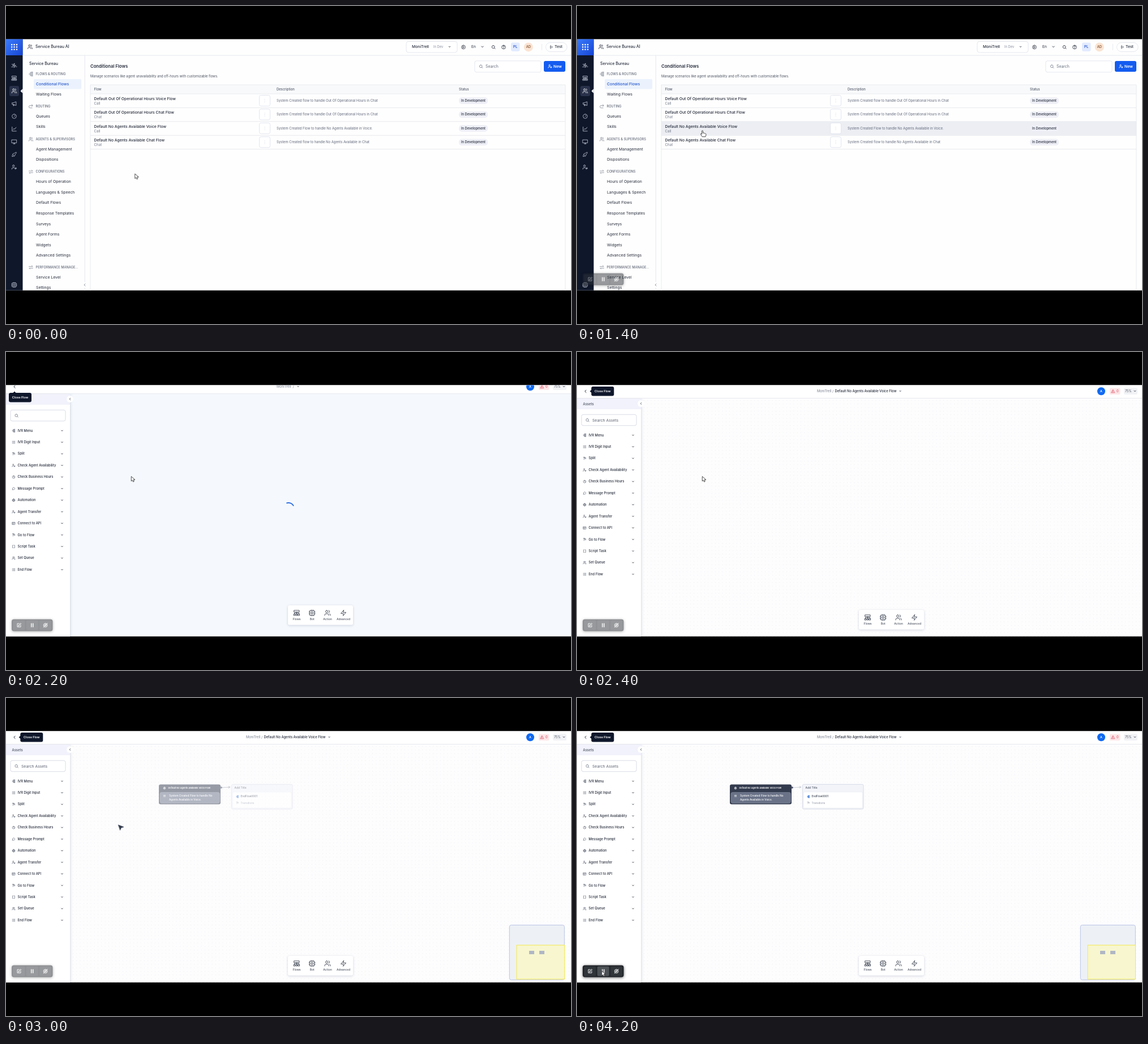
An HTML page with a canvas for the animation above (4400 ms loop, 998 by 561 pixels).

```html
<!DOCTYPE html>
<html lang="en">
<head>
<meta charset="utf-8">
<title>Flow console</title>
<style>
html, body { margin: 0; width: 100%; height: 100%; overflow: hidden; background: #000; }
canvas { display: block; }
</style>
</head>
<body>
<canvas id="stage" width="998" height="561"></canvas>
<script>
const stage = document.getElementById('stage');
const spare = stage.cloneNode();
let ctx = stage.getContext('2d');
const STEP = 200, LOOP = 4400;
const INK = '#252b3a', GREY = '#747b8a', LINE = '#e3e5ec', BLUE = '#145cf0', NIGHT = '#0f172b';

// Icons live on a 24 unit grid
const RING = 'M12 3a9 9 0 1 0 0 18a9 9 0 0 0 0-18';
const USER = 'M16 21v-2a4 4 0 0 0-4-4H6a4 4 0 0 0-4 4v2M9 3a4 4 0 1 0 0 8a4 4 0 0 0 0-8';
const icons = {
  user: USER + 'M19 14v6M16 17h6',
  users: USER + 'M22 21v-2a4 4 0 0 0-3-3.9M16 3.1a4 4 0 0 1 0 7.8',
  bolt: 'M13 2L3 14h9l-1 8 10-12h-9z',
  spark: 'M13 3L5 13h7l-1 8 8-10h-7zM2 7h5M1 18h5M18 17h5',
  tree: 'M3 3h18v6H3zM12 9v7M4 16v-4h16v4M2 16h5v5H2zM10 16h4v5h-4zM17 16h5v5h-5z',
  horn: 'M3 9v6h4l13 5V4L7 9zM8 15v6h3v-5',
  gauge: RING + 'M12 13l4-5',
  clock: RING + 'M12 7v5l4 2',
  chart: 'M3 3v18h18M7 15l4-5 3 3 6-8',
  screen: 'M2 4h20v13H2zM8 21h8M12 17v4',
  rocket: 'M9 15l-5-3 5-4h3c3-5 9-5 9-5s0 6-5 9v3l-4 5zM4 16l-1 5 5-1',
  chip: 'M4 4h16v16H4zM9 9h6v6H9zM9 1v3M15 1v3M9 20v3M15 20v3M1 9h3M1 15h3M20 9h3M20 15h3',
  search: 'M11 3a8 8 0 1 0 0 16a8 8 0 0 0 0-16M17 17l5 5',
  down: 'M5 8l7 8 7-8',
  left: 'M16 4l-8 8 8 8',
  help: RING + 'M9 9a3 3 0 1 1 4 3l-1 2M12 16v1',
  target: RING + 'M10 8l6 4-6 4z',
  play: 'M6 4l13 8-13 8z',
  swap: 'M2 8h19l-5-5M22 16H3l5 5',
  share: 'M2 12h7M9 4v16M9 4h6M9 20h6M9 12h6M16 2h5v4h-5zM16 10h5v4h-5zM16 18h5v4h-5z',
  turn: 'M20 8H8a5 5 0 0 0 0 12h10M16 3l5 5-5 5',
  list: 'M3 5h4M11 5h10M3 12h4M11 12h10M3 19h4M11 19h10',
  split: 'M3 4h11M8 4v16M14 9h7M14 4v10h7',
  chat: 'M4 20l1-4a8 8 0 1 1 3 3z',
  globe: RING + 'M3 12h18M12 3c-5 5-5 13 0 18M12 3c5 5 5 13 0 18',
  box: 'M3 4h18v16H3zM3 10h18M9 10v10',
  braces: 'M9 3H5v18h4M15 3h4v18h-4',
  warn: 'M12 3L2 21h20zM12 10v5M12 17v1',
  edit: 'M12 4H4v16h16v-8M9 15l1-4 9-9 3 3-9 9z',
  pause: 'M8 4v16M16 4v16',
  stop: RING + 'M12 8a4 4 0 1 0 0 8a4 4 0 0 0 0-8M3 22L22 2',
  hand: 'M8 22l-5-8c-1-3 2-3 4 0V3c0-3 4-3 4 0v7c1-2 3-1 4 1 1-2 3-1 4 1 3-1 3 2 3 4l-2 6z',
  arrow: 'M3 1v19l5-4 3 7 4-2-3-7h6z',
  dart: 'M1 2l21 8-10 3-4 9z'
};
for (const name in icons) icons[name] = new Path2D(icons[name]);

function icon(name, cx, cy, size, color, weight = 0.8, fill) {
  const s = size / 24;
  ctx.save();
  ctx.translate(cx - size / 2, cy - size / 2);
  ctx.scale(s, s);
  ctx.lineWidth = weight / s;
  ctx.lineJoin = ctx.lineCap = 'round';
  if (fill) { ctx.fillStyle = fill; ctx.fill(icons[name]); }
  ctx.strokeStyle = color;
  ctx.stroke(icons[name]);
  ctx.restore();
}

function text(str, x, y, size, color = INK, weight = 400, align = 'left') {
  ctx.font = `${weight} ${size}px Inter, sans-serif`;
  ctx.textBaseline = 'middle';
  ctx.textAlign = align;
  ctx.fillStyle = color;
  ctx.fillText(str, x, y);
}

function rect(x, y, w, h, color) {
  ctx.fillStyle = color;
  ctx.fillRect(x, y, w, h);
}

function box(x, y, w, h, r, fill, stroke, weight = 0.9) {
  ctx.beginPath();
  ctx.roundRect(x, y, w, h, r);
  if (fill) { ctx.fillStyle = fill; ctx.fill(); }
  if (stroke) { ctx.strokeStyle = stroke; ctx.lineWidth = weight; ctx.stroke(); }
}

function disc(x, y, r, color) {
  ctx.beginPath();
  ctx.arc(x, y, r, 0, 7);
  ctx.fillStyle = color;
  ctx.fill();
}

function shadowed(blur, color, draw) {
  ctx.save();
  ctx.shadowBlur = blur;
  ctx.shadowColor = color;
  ctx.shadowOffsetY = 1;
  draw();
  ctx.restore();
}

// Fades a whole group as one picture, so overlapping parts do not add up
function layer(alpha, draw) {
  const base = ctx;
  ctx = spare.getContext('2d');
  ctx.clearRect(0, 0, 998, 561);
  draw();
  ctx = base;
  ctx.globalAlpha = alpha;
  ctx.drawImage(spare, 0, 0);
  ctx.globalAlpha = 1;
}

const rail = ['spark', 'tree', 'users', 'horn', 'gauge', 'chart', 'screen', 'rocket', 'user'];
const menu = [
  ['share', 'FLOWS & ROUTING', 120, ['Conditional Flows', 'Waiting Flows']],
  ['turn', 'ROUTING', 177, ['Queues', 'Skills']],
  ['users', 'AGENTS & SUPERVISORS', 235, ['Agent Management', 'Dispositions']],
  ['swap', 'CONFIGURATIONS', 292.5, ['Hours of Operation', 'Languages & Speech', 'Default Flows',
    'Response Templates', 'Surveys', 'Agent Forms', 'Widgets', 'Advanced Settings']],
  ['swap', 'PERFORMANCE MANAGE...', 461, ['Service Level', 'Settings']]
];
const flows = [
  ['Out Of Operational Hours Voice', 'Call', 'flow to handle Out Of Operational Hours in Chat'],
  ['Out Of Operational Hours Chat', 'Chat', 'flow to handle Out Of Operational Hours in Chat'],
  ['No Agents Available Voice', 'Call', 'Flow to handle No Agents Available in Voice.'],
  ['No Agents Available Chat', 'Chat', 'flow to handle No Agents Available in Chat']
];
const assets = [
  ['share', 'IVR Menu'], ['list', 'IVR Digit Input'], ['split', 'Split'],
  ['user', 'Check Agent Availability'], ['clock', 'Check Business Hours'],
  ['chat', 'Message Prompt'], ['globe', 'Automation'], ['user', 'Agent Transfer'],
  ['box', 'Connect to API'], ['split', 'Go to Flow'], ['braces', 'Script Task'],
  ['users', 'Set Queue'], ['list', 'End Flow']
];

function drawRail() {
  rect(0, 58, 29.5, 444, NIGHT);
  const g = ctx.createLinearGradient(0, 58, 29, 87);
  g.addColorStop(0, '#3b7bfa');
  g.addColorStop(1, '#1746d6');
  rect(0, 58, 29.5, 29, g);
  for (let i = 0; i < 9; i++) box(9 + i % 3 * 4.4, 67 + Math.floor(i / 3) * 4.2, 2.4, 2.4, 0.6, '#fff');
  box(6, 141, 17, 18, 3, '#29324a');
  rail.forEach((name, i) => icon(name, 14.5, 105 + i * 22.4, 10, i === 2 ? '#fff' : '#c3c9d6'));
  icon('chip', 14.5, 492, 10, '#c3c9d6');
  ctx.beginPath();
  ctx.moveTo(29.5, 146); ctx.lineTo(25.5, 150); ctx.lineTo(29.5, 154);
  ctx.fillStyle = '#fff';
  ctx.fill();
}

function drawMenu() {
  rect(138.7, 87, 0.9, 415, LINE);
  text('Service Bureau', 41, 101.5, 7, INK, 500);
  box(49, 129, 84, 17.5, 2, '#ebf2fd');
  for (const [name, title, y, items] of menu) {
    icon(name, 44, y, 8.5, GREY, 0.7);
    text(title, 52.5, y, 5.7, '#626978', 500);
    items.forEach((item, i) => {
      const active = item === 'Conditional Flows';
      text(item, 53, y + 17.8 + i * 18.55, 6.85, active ? '#2154c9' : INK, active ? 500 : 400);
    });
  }
  disc(139, 492, 5, '#fff');
  icon('left', 139, 492, 6, GREY);
}

function drawTopBar() {
  rect(29.5, 86.6, 969, 0.9, LINE);
  icon('users', 42.5, 72, 9.5, INK);
  text('Service Bureau AI', 52, 72, 7, INK, 500);
  box(707, 62.5, 90, 19.5, 4, '#fff', LINE);
  text('MoniTrell', 717, 72, 6.8, INK, 500);
  text('In Dev', 755, 72.3, 5.8, '#8a90a0');
  icon('down', 783.5, 72, 4.5, INK);
  icon('target', 808, 72.5, 9, INK);
  text('En', 822, 72.3, 6.6);
  icon('down', 841.5, 72, 6, INK);
  icon('search', 861, 72.5, 7.5, INK);
  icon('help', 879, 72.5, 9, INK);
  box(892, 64.5, 15.5, 15.5, 3, '#e2ebff');
  text('PL', 899.7, 72.3, 6, '#2552c8', 600, 'center');
  disc(922.8, 72.4, 8, '#fae4d3');
  text('AD', 922.8, 72.4, 5.8, '#7c4c2b', 500, 'center');
  rect(946, 67, 0.8, 11, LINE);
  box(953.5, 64.5, 37.5, 16, 8, '#fff', LINE);
  icon('play', 963.5, 72.4, 6.5, INK, 0.7);
  text('Test', 969, 72.3, 6.8, INK, 500);
}

function drawList(hovered) {
  rect(0, 58, 998, 444, '#fefefe');
  drawRail();
  drawMenu();
  drawTopBar();
  text('Conditional Flows', 149, 106.5, 7.7, INK, 600);
  text('Manage scenarios like agent unavailability and off-hours with customizable flows.', 149, 124.7, 5.85, '#4b5260');
  box(828, 96.8, 117, 20, 3, '#fff', LINE);
  icon('search', 839, 106.6, 7, GREY);
  text('Search', 847, 106.7, 6.9, '#646b7a');
  box(950, 97, 38, 19, 3, BLUE);
  icon('user', 961, 106.4, 7.5, '#fff');
  text('New', 967, 106.7, 6.8, '#fff', 600);

  rect(149, 139, 839, 16, '#f8f9fb');
  text('Flow', 155.5, 147.3, 5.8, '#555c6b', 500);
  text('Description', 478, 147.3, 5.8, '#555c6b', 500);
  text('Status', 800, 147.3, 5.8, '#555c6b', 500);
  flows.forEach(([name, kind, about], i) => {
    const y = 155 + i * 24.4;
    if (hovered && i === 2) rect(149, y, 839, 24, '#eceef3');
    rect(149, y + 24, 839, 0.8, LINE);
    text(`Default ${name} Flow`, 155.5, y + 8.7, 6.8, INK, 500);
    text(kind, 155.5, y + 17, 6.2, GREY);
    box(447.5, y + 2.5, 19, 19, 3, '#fff', '#dfe2ed');
    for (const d of [-2.5, 0, 2.5]) disc(457, y + 12 + d, 0.5, '#c6cbd6');
    text(`System Created ${about}`, 478, y + 12.2, 5.9, '#60677a');
    box(800, y + 6.3, 51, 11.6, 5, '#eff0f7');
    text('In Development', 825.5, y + 12.2, 5.75, INK, 500, 'center');
  });
  rect(149, 138.6, 839, 0.8, LINE);
  rect(149, 154.6, 839, 0.8, LINE);
  rect(148.6, 139, 0.8, 363, LINE);
  rect(987.6, 139, 0.8, 363, LINE);
}

function drawTooltip(x, y, tipX, tipY) {
  box(x, y, 40, 16.5, 3, NIGHT);
  ctx.save();
  ctx.translate(tipX, tipY);
  ctx.rotate(Math.PI / 4);
  rect(-1.8, -1.8, 3.6, 3.6, NIGHT);
  ctx.restore();
  text('Close Flow', x + 20, y + 8.4, 5.4, '#fff', 600, 'center');
}

function drawAssets(loading) {
  shadowed(5, 'rgba(40,50,90,.25)', () => rect(0, 82, 113, 440, '#fff'));
  rect(0, 82, 113, 19, '#f1f2fb');
  if (!loading) text('Assets', 10.5, 91.8, 5.9, '#4b5260', 500);
  disc(113, 91, 6, '#fff');
  icon('left', 113, 91, 5, INK, 0.7);
  box(8, 110.3, 97, 19.5, 3, '#fff', '#d6d9e4');
  icon('search', 18.5, 120.2, 7, GREY);
  if (!loading) text('Search Assets', 27, 120.5, 6.8, '#5a6170');
  assets.forEach(([name, label], i) => {
    const y = 146.8 + i * 20.44;
    icon(name, 13.5, y, 6.2, '#596070', 0.65);
    text(label, 20.5, y, 5.85, INK, 500);
    icon('down', 99, y, 4.2, INK);
  });
}

function drawDock() {
  shadowed(4, 'rgba(40,50,90,.2)', () => box(498, 455, 115, 34.5, 3, '#fff'));
  const tools = [['tree', 'Flows', 513.5], ['chip', 'Bot', 540.7], ['users', 'Action', 568], ['bolt', 'Advanced', 596]];
  for (const [name, label, x] of tools) {
    icon(name, x, 468.3, 12, '#3a4150', 0.9);
    text(label, x, 479, 5, '#4b5260', 500, 'center');
  }
}

function drawFlowBar(titled) {
  rect(0, 50, 998, 31, '#fff');
  rect(0, 81, 998, 0.8, LINE);
  icon('left', 15, 69.3, 6.5, INK, 1);
  if (titled) {
    text('MoniTrell /', 453, 69.5, 5.8, GREY, 400, 'right');
    text('Default No Agents Available Voice Flow', 455.5, 69.5, 5.8, INK, 500);
    icon('down', 571, 69, 4, INK);
  } else {
    text('MoniTrell  /', 478, 69.5, 5.8, GREY);
    icon('down', 516, 69, 4, INK);
  }
  disc(926, 69.3, 7, '#116af2');
  text('A', 926, 69.6, 5.2, '#fff', 600, 'center');
  box(941, 63.5, 18.5, 11.5, 2, '#fde6e8');
  icon('warn', 946.5, 69.2, 7, '#d94c62', 0.7);
  text('0', 953, 69.6, 5.8, '#d94c62');
  box(966, 63.5, 24, 11.5, 2, '#f1f2f5');
  text('75%', 968, 69.5, 5.5, '#4b5260');
  icon('down', 985.5, 69, 5, INK);
}

function drawMap() {
  box(889.3, 400.6, 97, 96.6, 3, '#edf1f6', '#b4bfe2');
  rect(902, 436, 84.5, 60, '#f7f6cf');
  ctx.strokeStyle = '#f5e94f';
  ctx.lineWidth = 1;
  ctx.strokeRect(902, 436, 84.5, 60);
  rect(924, 446, 9, 6, '#b0b7c4');
  rect(942, 446, 9, 6, '#b0b7c4');
}

function drawLink() {
  ctx.beginPath();
  ctx.moveTo(381, 158); ctx.lineTo(396, 157.3);
  ctx.moveTo(392.5, 155.5); ctx.lineTo(396, 157.3); ctx.lineTo(392.5, 159.3);
  ctx.strokeStyle = '#bfc3cc';
  ctx.lineWidth = 0.8;
  ctx.stroke();
}

function drawNodes() {
  box(270, 152.5, 109, 35, 3, '#333b4e');
  disc(380, 158, 1.8, '#4a5266');
  icon('target', 280, 159, 5, '#fff', 0.7);
  text('Default No Agents Available Voice Flow', 286.5, 159.2, 3.95, '#fff', 600);
  box(272, 166.5, 105.5, 19, 3, '#697287', '#8991a3', 0.6);
  icon('list', 280, 172.7, 4.5, '#fff', 0.6);
  text('System Created Flow to handle No', 288, 172.9, 4.65, '#fff', 500);
  text('Agents Available in Voice.', 288, 179.6, 4.65, '#fff', 500);

  box(398.3, 152.3, 107.7, 43.7, 2.5, '#f2f4f9', '#d5d9e6');
  text('Add Title', 403.5, 158.7, 5, '#3a4150');
  box(400, 165.8, 104.4, 28.4, 2, '#fff', '#e3e6ef', 0.6);
  icon('share', 408.7, 174, 5, '#2f6fd0', 0.7);
  text('EndFlow0001', 414.5, 174, 4.6, '#3a4150', 500);
  icon('split', 408.7, 185, 5, '#a8aebb', 0.6);
  text('Transitions', 414.5, 185.2, 4.6, '#8f96a5');
}

function drawSpinner(turn) {
  ctx.beginPath();
  ctx.arc(499, 284, 10, turn, turn + 1.5);
  ctx.strokeStyle = '#2f6fe4';
  ctx.lineWidth = 1.9;
  ctx.stroke();
}

function drawFlow(step) {
  const entering = step === 10, loading = step < 12;
  ctx.save();
  ctx.translate(0, entering ? -20 : loading ? -8 : 0);
  rect(0, 50, 998, 480, loading && !entering ? '#f5f9fd' : '#fdfdfe');
  if (!loading) {
    for (let x = 118; x < 998; x += 6.3) {
      for (let y = 85; y < 502; y += 6.3) rect(x, y, 0.8, 0.8, '#e4e5ea');
    }
  }
  if (step >= 14) { drawMap(); drawLink(); }
  if (step >= 15) layer(step === 15 ? 0.5 : 1, drawNodes);
  drawAssets(loading);
  drawFlowBar(!loading);
  drawDock();
  if (loading) {
    drawSpinner(entering ? -2.3 : -1.95);
    drawTooltip(5, 80, 15, 80);
  } else {
    drawTooltip(25.3, 61, 25.3, 69.3);
  }
  ctx.restore();
}

function drawRecorder(hovered) {
  shadowed(5, 'rgba(0,0,0,.55)', () => box(10, 471.5, 72.5, 21, 4, '#23272c'));
  ['edit', 'pause', 'stop'].forEach((name, i) => {
    const x = 23 + i * 23.3;
    box(x - 10.5, 473.5, 21, 17, 2, hovered && i === 1 ? '#4d5257' : '#30353a');
    icon(name, x, 482, 9, '#fff', name === 'pause' ? 1.4 : 0.9);
  });
}

// [first step, shape, tip x, tip y]
const pointer = [
  [0, 'arrow', 228, 296], [4, 'arrow', 232, 276], [5, 'hand', 219, 219], [10, 'arrow', 221.5, 219.5],
  [13, 'dart', 212, 221], [14, 'dart', 198.5, 223.5], [17, 'dart', 191.5, 243.5],
  [18, 'arrow', 88, 369], [19, 'arrow', 62, 461], [20, 'arrow', 52, 478], [21, 'arrow', 44, 481.5]
];

function drawPointer(step) {
  const [, shape, x, y] = pointer.filter(p => p[0] <= step).pop();
  if (shape === 'dart') icon(shape, x + 5, y + 5, 11, '#333b4e', 0.6, '#333b4e');
  else if (shape === 'hand') icon(shape, x + 4, y + 6.3, 12, '#222', 0.8, '#fff');
  else icon(shape, x + 3.5, y + 5, 10, '#222', 0.8, '#fff');
}

function drawStep(step) {
  rect(0, 0, 998, 561, '#000');
  ctx.save();
  ctx.beginPath();
  ctx.rect(0, 58.5, 998, 443.2);
  ctx.clip();
  if (step <= 10) drawList(step >= 5);
  if (step === 10) layer(0.25, () => drawFlow(step));
  if (step > 10) drawFlow(step);
  if (step >= 1) layer(step >= 20 ? 1 : 0.5, () => drawRecorder(step >= 21));
  drawPointer(step);
  ctx.restore();
}

let shown = -1;
function tick() {
  const step = Math.floor(performance.now() % LOOP / STEP);
  if (step !== shown) drawStep(shown = step);
  requestAnimationFrame(tick);
}
tick();
</script>
</body>
</html>
```
